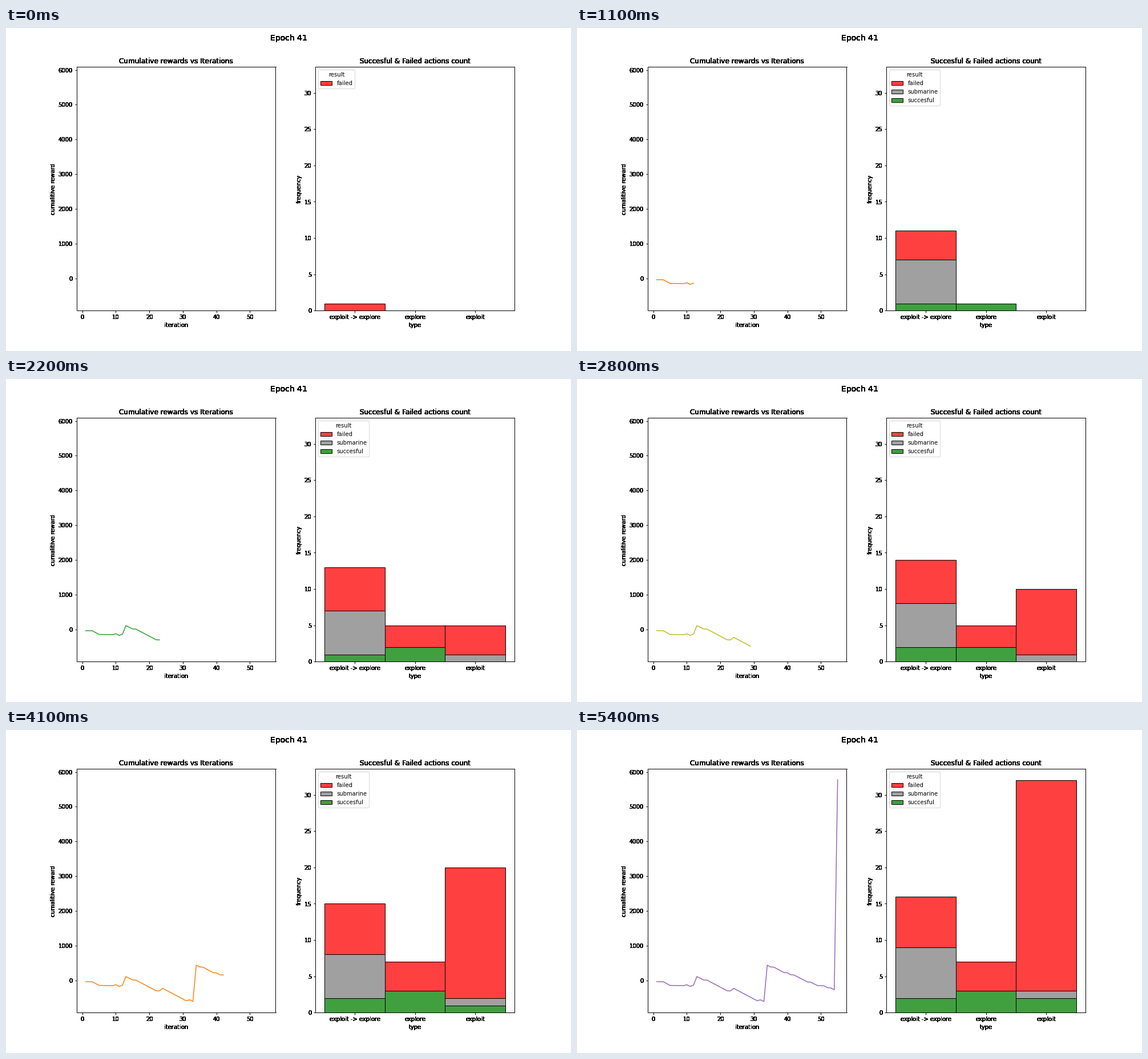
These frames come from a looping animation (990x566 px, 5.5 s). A matplotlib script:

```python
import numpy as np
import matplotlib.pyplot as plt
from matplotlib.animation import FuncAnimation
from matplotlib.colors import to_rgba
from matplotlib.patches import Patch

plt.rcParams.update({
    "font.family": "DejaVu Sans",
    "font.size": 10,
    "axes.linewidth": 1,
    "xtick.major.width": 1,
    "ytick.major.width": 1,
})

STEPS = 55
TYPES = ["exploit -> explore", "explore", "exploit"]
RESULTS = ["failed", "submarine", "succesful"]
FILLS = [to_rgba(c, 0.75) for c in ("red", "gray", "green")]
MIXED, EXPLORE, EXPLOIT = range(3)
FAIL, SUB, WIN = range(3)

# Runs of equal actions: (length, type, result)
RUNS = [
    (1, MIXED, FAIL), (2, MIXED, SUB), (2, MIXED, FAIL), (4, MIXED, SUB),
    (1, MIXED, WIN), (1, MIXED, FAIL), (2, EXPLORE, WIN), (1, MIXED, FAIL),
    (1, EXPLORE, FAIL), (1, EXPLOIT, SUB), (1, EXPLOIT, FAIL),
    (1, MIXED, FAIL), (1, EXPLORE, FAIL), (3, EXPLOIT, FAIL),
    (1, EXPLORE, FAIL), (1, MIXED, WIN), (7, EXPLOIT, FAIL),
    (1, EXPLORE, WIN), (1, EXPLOIT, FAIL), (1, EXPLOIT, WIN),
    (1, MIXED, FAIL), (1, EXPLORE, FAIL), (13, EXPLOIT, FAIL),
    (1, MIXED, SUB), (4, EXPLOIT, FAIL), (1, EXPLOIT, WIN),
]

# Corners of the cumulative reward curve: iteration -> reward
CORNERS = {
    1: -40, 3: -43, 5: -148, 9: -155, 10: -128, 11: -176, 12: -140, 13: 107,
    15: 10, 16: 5, 22: -300, 23: -307, 24: -232, 31: -590, 32: -562,
    33: -612, 34: 435, 35: 385, 36: 378, 39: 222, 40: 214, 41: 160, 42: 152,
    46: -48, 47: -56, 49: -152, 51: -161, 52: -212, 53: -220, 54: -275,
    55: 5775,
}


def count_actions():
    """Running counts, indexed by step, type and result."""
    hits = np.zeros((STEPS, 3, 3), int)
    step = 0
    for length, kind, result in RUNS:
        hits[step:step + length, kind, result] = 1
        step += length
    return hits.cumsum(axis=0)


def overdraw(text, times=15):
    """Draw a text repeatedly so its soft edges build up to black."""
    draw = text.draw

    def repeated(renderer):
        for _ in range(times):
            draw(renderer)

    text.draw = repeated


def dress(ax, title, xlabel, ylabel):
    ax.set_title(title)
    ax.set_xlabel(xlabel)
    ax.set_ylabel(ylabel)
    labels = ax.get_xticklabels() + ax.get_yticklabels()
    for text in labels + [ax.title, ax.xaxis.label, ax.yaxis.label]:
        overdraw(text)


counts = count_actions()
iters = np.arange(1, STEPS + 1)
rewards = np.interp(iters, list(CORNERS), list(CORNERS.values()))

fig, (left, right) = plt.subplots(1, 2, figsize=(13.75, 7.862), dpi=72)
fig.subplots_adjust(left=0.125, right=0.9, bottom=0.125, top=0.88, wspace=0.2)
overdraw(fig.suptitle("Epoch 41", fontsize=14))

pad = 0.05 * np.ptp(rewards)
left.set_xlim(-1.7, 57.7)
left.set_ylim(rewards.min() - pad, rewards.max() + pad)
left.set_xticks(range(0, 51, 10))
left.set_yticks(range(0, 6001, 1000))
dress(left, "Cumulative rewards vs Iterations", "iteration",
      "cumalitive reward")
curve, = left.plot([], [], lw=1.5)

bars = [right.bar(range(3), [0] * 3, width=1, color=fill, edgecolor="black",
                  linewidth=1) for fill in FILLS]
right.set_xlim(-0.65, 2.65)
right.set_ylim(0, 33.6)
right.set_xticks(range(3), TYPES)
right.set_yticks(range(0, 31, 5))
dress(right, "Succesful & Failed actions count", "type", "frequency")
keys = [Patch(facecolor=fill, edgecolor="black", linewidth=1, label=name)
        for fill, name in zip(FILLS, RESULTS)]


def update(step):
    curve.set_data(iters[:step + 1], rewards[:step + 1])
    curve.set_color(f"C{step % 10}")

    base = np.zeros(3)
    for result in (WIN, SUB, FAIL):
        heights = counts[step, :, result]
        for bar, bottom, height in zip(bars[result], base, heights):
            bar.set_y(bottom)
            bar.set_height(height)
            bar.set_visible(height > 0)
        base = base + heights

    seen = counts[step].sum(axis=0) > 0
    right.legend(handles=[k for k, s in zip(keys, seen) if s],
                 title="result", loc="upper left")
    return []


anim = FuncAnimation(fig, update, frames=STEPS, interval=100,
                     init_func=lambda: [], repeat=True, repeat_delay=0)
plt.show()
```
